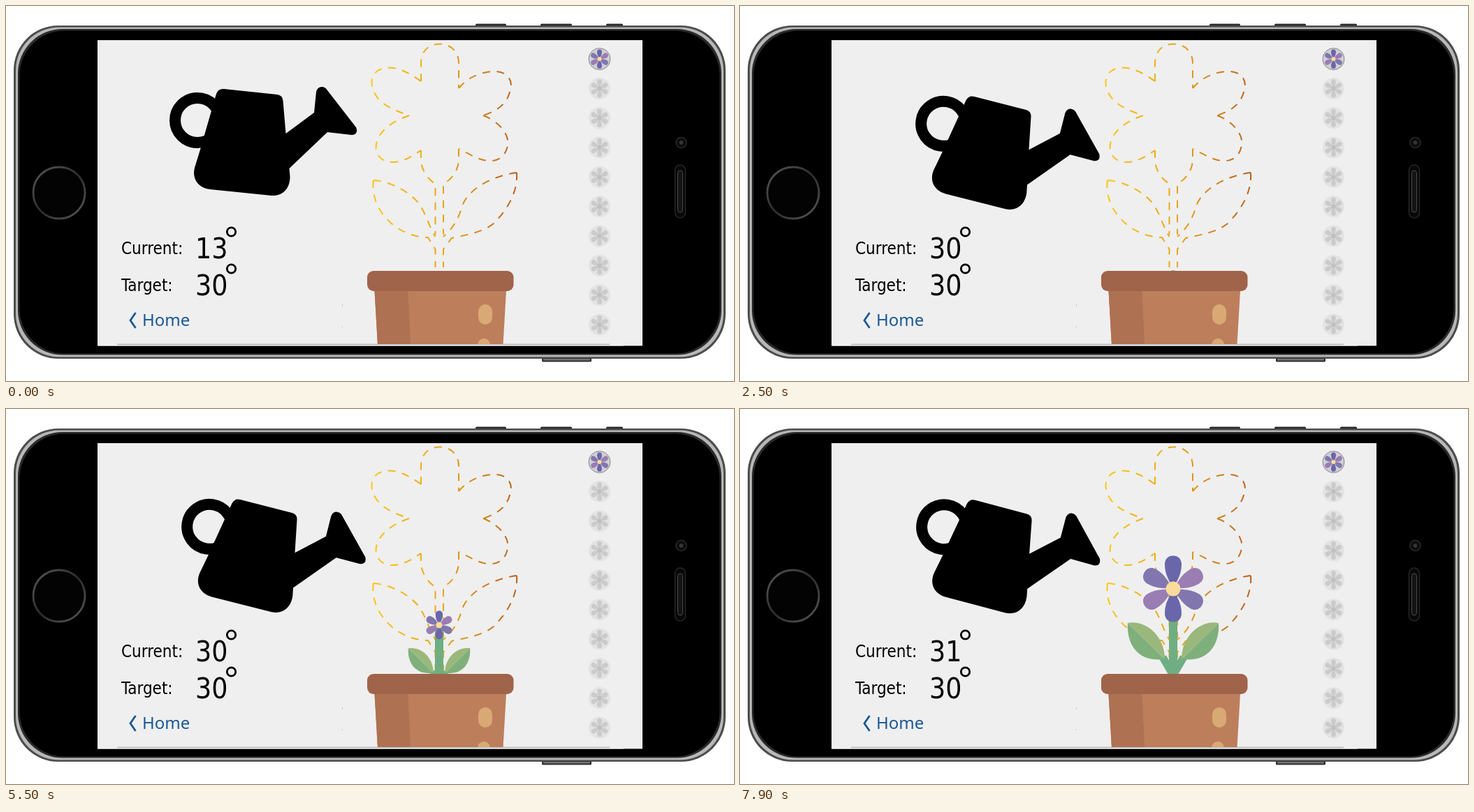
Write an HTML page that moves like this. It is 1042 by 538 pixels and loops after 8 s.

```html
<!DOCTYPE html>
<html lang="en">
<head>
<meta charset="utf-8">
<title>Watering can</title>
<style>
  html, body { margin: 0; width: 100%; height: 100%; overflow: hidden; background: #fff; }
  svg { display: block; width: 100%; height: 100%; }
  text { font-family: "DejaVu Sans Condensed", "Noto Sans", sans-serif; font-size: 24px; fill: #000; }
  .value { font-size: 40.5px; }
  .home { font-family: "Noto Sans", "Open Sans", sans-serif; fill: #1a5896; }
  .ring { fill: none; stroke: #000; stroke-width: 2.8; }
  .dashes { fill: none; stroke: url(#warm); stroke-width: 2; stroke-dasharray: 11 9.5; }
</style>
</head>
<body>
<svg viewBox="0 0 1042 538">
  <defs>
    <linearGradient id="warm" gradientUnits="userSpaceOnUse" x1="524" y1="0" x2="732" y2="0">
      <stop offset="0" stop-color="#fcc419"/>
      <stop offset=".5" stop-color="#e6a31c"/>
      <stop offset="1" stop-color="#b8601c"/>
    </linearGradient>
    <linearGradient id="metal" x1="0" y1="0" x2="1" y2="1">
      <stop offset="0" stop-color="#5a5a5a"/>
      <stop offset=".5" stop-color="#2c2c2c"/>
      <stop offset="1" stop-color="#5a5a5a"/>
    </linearGradient>
    <path id="petal" d="M0 0C-4 -10 -12 -19 -12 -35C-12 -43 -7 -47.500 0 -47.500S12 -43 12 -35C12 -19 4 -10 0 0Z"/>
    <g id="flower">
      <g fill="#9a7db3"><use href="#petal" transform="rotate(60)"/><use href="#petal" transform="rotate(240)"/></g>
      <g fill="#8176ae"><use href="#petal" transform="rotate(120)"/><use href="#petal" transform="rotate(300)"/></g>
      <g fill="#6a66aa"><use href="#petal"/><use href="#petal" transform="rotate(180)"/></g>
      <circle r="10.500" fill="#f9dc9c"/>
    </g>
    <g id="badge">
      <circle r="15.500" fill="#e3e3e3"/>
      <g id="greyPetals" fill="#cbcbcb" transform="scale(.28)"></g>
      <circle r="3" fill="#c0c0c0"/>
    </g>
    <g id="leaf">
      <path d="M0 2L-15 -24" stroke="#6fae82" stroke-width="11"/>
      <path d="M-65 -73C-67 -42 -50 -16 -12 -21Z" fill="#7fb07c"/>
      <path d="M-65 -73C-40 -78 -12 -55 -12 -21Z" fill="#9ab87b"/>
    </g>
    <clipPath id="screen"><rect x="131" y="49" width="780" height="436"/></clipPath>
  </defs>

  <!-- phone -->
  <g fill="#2b2b2b">
    <rect x="672" y="25.500" width="44" height="5" rx="1.500"/>
    <rect x="765" y="25.500" width="45" height="5" rx="1.500"/>
    <rect x="859" y="25.500" width="24" height="5" rx="1.500"/>
    <rect x="767" y="504" width="71" height="6.500" rx="1.500"/>
  </g>
  <path d="M769 507.500H836" stroke="#999" stroke-width="1.500"/>
  <rect x="11" y="28" width="1019" height="478" rx="64" fill="#4c4c4c"/>
  <rect x="14" y="30.500" width="1013" height="473" rx="62" fill="#b8b8b8"/>
  <rect x="17" y="33" width="1007" height="467.500" rx="64" fill="#2a2a2a"/>
  <rect x="19.500" y="35.500" width="1002" height="463" rx="64" fill="#000"/>
  <circle cx="76" cy="268" r="37" fill="#030303" stroke="url(#metal)" stroke-width="2.800"/>
  <circle cx="966.500" cy="196" r="7.500" fill="#0b0b0b" stroke="#2c2c2c" stroke-width="1.500"/>
  <circle cx="966.500" cy="196" r="3" fill="#333"/>
  <rect x="957.500" y="228" width="15" height="76" rx="7.500" fill="#080808" stroke="#262626" stroke-width="1.500"/>
  <rect x="961.500" y="236" width="7" height="60" rx="3.500" fill="#141414" stroke="#4a4a4a"/>

  <rect x="131" y="49" width="780" height="438.500" fill="#efefef"/>
  <path d="M131.500 49V487H884" fill="none" stroke="#fafafa"/>
  <path d="M159 485.500H864" stroke="#b9b9b9" stroke-width="1.500"/>
  <path d="M481.500 428v3M481.500 459v2" stroke="#c4c4c4"/>

  <text x="165" y="356">Current:</text>
  <text x="165" y="409">Target:</text>
  <text x="271" y="362" class="value" id="current">13</text>
  <text x="271" y="415" class="value">30</text>
  <circle cx="322.500" cy="324" r="6.200" class="ring"/>
  <circle cx="322.500" cy="377" r="6.200" class="ring"/>
  <path d="M185.500 440L178 451L185.500 462" fill="none" stroke="#1a5896" stroke-width="2.800"/>
  <text x="195" y="459" class="home">Home</text>

  <g id="badges"></g>
  <g transform="translate(849.500 76)">
    <circle r="15.500" fill="#d0d0d4" stroke="#85858f"/>
    <use href="#flower" transform="scale(.29)"/>
  </g>

  <!-- outline to grow into -->
  <g class="dashes">
    <path d="M594 108V82C594 64 605 54.500 621 54.500S648 66 648 82V118"/>
    <path d="M594 108C575 94 560 88 546 88.500C530 90 523 99 523.500 111C526 137 550 148 577 157"/>
    <path d="M648 118C662 101 682 94 700 94C716 94 723 104 723 114C720 138 707 149 683 157"/>
    <path d="M683 157C702 164 718 180 718.500 196C717 213 708 222 692 222.500C675 221 664 212 648 205"/>
    <path d="M577 157C548 167 529 184 529.500 204C531 219 543 225 556 224C573 222 583 214 594 207"/>
    <path d="M594 207V222C595 236 604 249 614.500 255V328"/>
    <path d="M648 205V222C647 236 638 249 626 255V328"/>
    <path d="M526 250C522 280 540 304 558 317C573 327 588 332 604 332L614.500 349V375"/>
    <path d="M526 250C552 252 580 268 592 285C602 300 606 318 614.500 331"/>
    <path d="M731 239C700 243 667 259 655 282C648 303 643 316 626 331"/>
    <path d="M731 239C733 266 718 292 698 312C682 325 660 328 638 333L626 349V375"/>
  </g>

  <g id="plant">
    <g id="leaves">
      <use href="#leaf"/>
      <use href="#leaf" transform="scale(-1 1)"/>
    </g>
    <path id="stem" stroke="#6fae82" stroke-width="12" stroke-linecap="round"/>
    <use href="#flower" id="bloom"/>
  </g>

  <!-- pot -->
  <g clip-path="url(#screen)">
    <path d="M527 400H716.500L711.500 486H532Z" fill="#bd7e5c"/>
    <path d="M527 400H575L579 486H532Z" fill="#ae7151"/>
    <rect x="517" y="380" width="209.500" height="29" rx="9" fill="#a0644a"/>
    <rect x="676" y="428" width="20" height="29" rx="10" fill="#d9a974"/>
    <rect x="675" y="477" width="18" height="26" rx="9" fill="#d9a974"/>
  </g>

  <g id="can">
    <circle cx="274" cy="164" r="32" fill="none" stroke="#000" stroke-width="16"/>
    <path d="M312 119L388 127Q396 128 396.500 136L400.500 183L441 153L444 123Q446 116 452 116Q457 116 460 121L501 174Q505 184 495 185L460 181L405.500 233L406.500 245C406.500 262 396 273 380 272L292 263C275 261 266 248 270 232L278 206L301 126Q304 118 312 119Z"/>
  </g>
</svg>
<script>
  const LOOP = 8000, STEP = 100;
  const $ = id => document.getElementById(id);
  const SVG = 'http://www.w3.org/2000/svg';

  function addUse(parent, href, transform) {
    const use = document.createElementNS(SVG, 'use');
    use.setAttribute('href', href);
    use.setAttribute('transform', transform);
    parent.append(use);
  }
  for (let i = 0; i < 6; i++) addUse($('greyPetals'), '#petal', `rotate(${i * 60})`);
  for (let i = 1; i < 10; i++) addUse($('badges'), '#badge', `translate(849.5 ${76 + 42.35 * i})`);

  // growth stages: time, stem height, flower scale, leaf scale, leaf depth below the rim
  const STAGES = [
    [2500, 1, 0, .35, 27],
    [4200, 38, 0, .56, 20],
    [5500, 70, .43, .68, 13],
    [6800, 101, .765, .875, 5],
    [7900, 122, 1, 1, 0]
  ];
  const TREMORS = [[3400, 4700], [6300, 7200], [7900, LOOP]];

  function growth(t) {
    const i = Math.max(1, STAGES.findIndex(s => t <= s[0]));
    const a = STAGES[i - 1], b = STAGES[i];
    const k = (t - a[0]) / (b[0] - a[0]);
    return a.map((v, j) => v + (b[j] - v) * k);
  }

  function degrees(t) {
    if (t < 600) return 13;
    if (t <= 1400) return Math.floor(13 + 13 * (t - 500) / 900);
    if (t < 2100) return 26;
    if (t < 2200) return 28;
    return TREMORS.some(([from, to]) => t >= from && t < to) ? 31 : 30;
  }

  function draw(now) {
    const t = Math.floor(now % LOOP / STEP) * STEP;
    const angle = degrees(t);
    $('current').textContent = angle;
    $('can').setAttribute('transform', `rotate(${(angle - 13) / 2} 250 282)`);

    const growing = t >= STAGES[0][0];
    $('plant').style.display = growing ? '' : 'none';
    if (growing) {
      const [, height, bloom, leaf, depth] = growth(t);
      const top = 380 - height;
      $('stem').setAttribute('d', `M620 395V${top + 6}`);
      $('bloom').setAttribute('transform', `translate(620 ${top}) scale(${bloom})`);
      $('leaves').setAttribute('transform', `translate(620 ${380 + depth}) scale(${leaf})`);
    }
  }

  const start = performance.now();
  function tick() {
    draw(performance.now() - start);
    requestAnimationFrame(tick);
  }
  tick();
</script>
</body>
</html>
```
